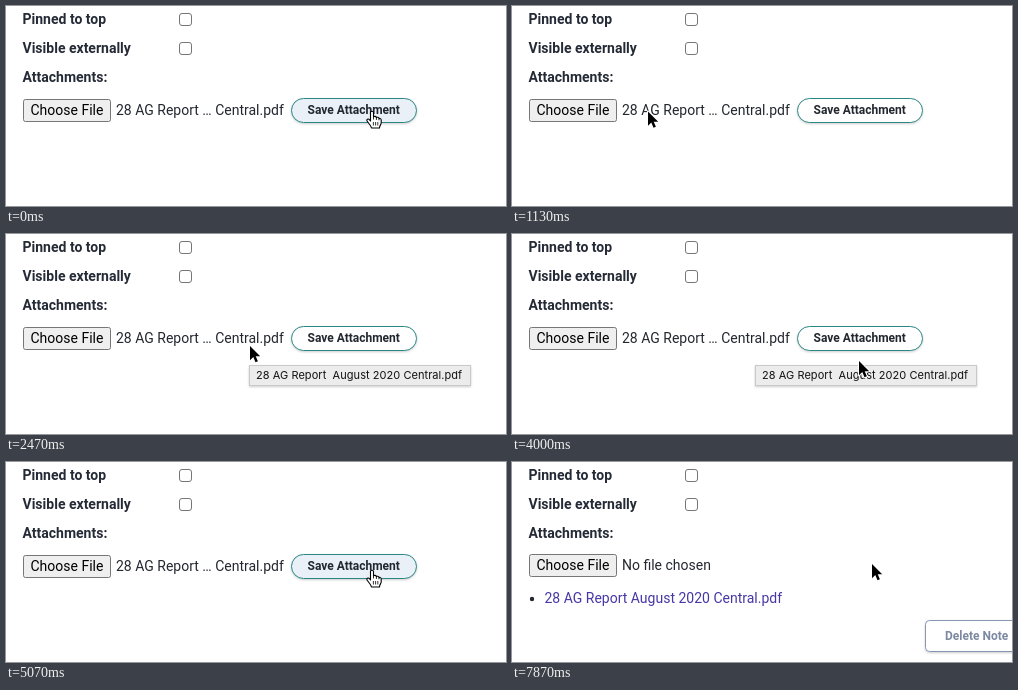
An HTML page for the animation above (8000 ms loop, 500 by 200 pixels).

```html
<!DOCTYPE html>
<html lang="en">
<head>
<meta charset="utf-8">
<title>Saving an attachment</title>
<style>
  html, body { margin: 0; width: 100%; height: 100%; overflow: hidden; background: #fff; }
  svg { display: block; width: 500px; height: 200px; }
  text { font: 14px Roboto, sans-serif; fill: #23272f; white-space: pre; }
  .label { font-weight: 700; fill: #252b36; }
  .action { font-size: 12px; font-weight: 700; }
  .tip { font: 11px Inter, sans-serif; fill: #111; letter-spacing: .05px; }
  .check { fill: #fff; stroke: #767676; }
</style>
</head>
<body>
<svg viewBox="0 0 500 200">
  <defs>
    <filter id="soft" x="-10%" y="-30%" width="120%" height="180%">
      <feDropShadow dx="0" dy="1" stdDeviation="1" flood-opacity=".2"/>
    </filter>
  </defs>
  <rect width="500" height="200" fill="#fff"/>

  <text class="label" x="16.5" y="18">Pinned to top</text>
  <text class="label" x="16.5" y="47">Visible externally</text>
  <text class="label" x="16.5" y="76">Attachments:</text>
  <rect class="check" x="173.5" y="7.5" width="12" height="12" rx="2.5"/>
  <rect class="check" x="173.5" y="36.5" width="12" height="12" rx="2.5"/>

  <g id="picker">
    <rect id="choose" x="17.5" y="93.5" width="87" height="22" rx="2"/>
    <text x="24.5" y="109" style="fill:#000">Choose File</text>
    <text id="fileName" x="110" y="109"></text>
  </g>

  <g id="save">
    <rect id="pill" x="285.5" y="92.5" width="125" height="24" rx="12" filter="url(#soft)"/>
    <rect id="focus" x="286" y="93" width="124" height="23" rx="4" fill="none" stroke="#5b9fe0" stroke-width="2"/>
    <text class="action" x="301.5" y="108">Save Attachment</text>
  </g>

  <g id="saved">
    <circle cx="20" cy="137" r="2.2" fill="#23272f"/>
    <text x="32.5" y="141" style="fill:#4637a5">28 AG Report August 2020 Central.pdf</text>
    <rect x="413.5" y="158.5" width="110" height="31" rx="4" fill="#fff" stroke="#8797b1" filter="url(#soft)"/>
    <text class="action" x="433" y="178" style="fill:#7c89a1">Delete Note</text>
  </g>

  <g id="tooltip">
    <rect x="243.5" y="131.5" width="221" height="20" fill="#ececec" stroke="#c9c9c9" filter="url(#soft)"/>
    <text class="tip" x="250" y="145">28 AG Report  August 2020 Central.pdf</text>
  </g>

  <g id="cursor" stroke-linejoin="round">
    <path id="arrow" d="M0 0V14.2L3.3 11.1 5.5 16.3 7.9 15.3 5.7 10.2H10.2Z"
      fill="#000" stroke="#fff" stroke-width="2" paint-order="stroke"/>
    <g id="hand" stroke="#000" stroke-width="1.1">
      <path d="M-1.5 1.6C-1.5-.3 1.5-.3 1.5 1.6V6C2 5 4.3 5.2 4.4 6.7 5 5.8 7 6.2 7 7.7 8 7 9.2 7.7 9.2 9V12C9 14 7.5 14.5 7.5 17H-.5C-.8 14.8-3 13-4.8 10.3-6 8.6-3.8 7.2-2.6 8.7L-1.5 10Z" fill="#fff"/>
      <path d="M1.5 6V8.5M4.4 6.7V9M7 7.7V9.3M1.4 11V14.5M3.6 11V14.5M5.8 11V14.5" fill="none" stroke-width=".8"/>
    </g>
  </g>
</svg>
<script>
const LOOP = 8000, TICKS_PER_MS = 15 / 1000;
const el = id => document.getElementById(id);
const show = (id, on) => el(id).setAttribute('display', on ? 'inline' : 'none');
const paint = (id, attrs) => {
  for (const [name, value] of Object.entries(attrs)) el(id).setAttribute(name, value);
};
const clamp = v => Math.min(1, Math.max(0, v));

const linear = u => u;
const out = u => 1 - (1 - u) ** 2;
const smooth = u => u * u * (3 - 2 * u);
const swing = u => (1 - Math.cos(.75 * Math.PI * u)) / (1 - Math.cos(.75 * Math.PI));

// Pointer stops: tick, x, y and the easing used to arrive there.
const stops = [
  [0, 366, 105], [9, 62.5, 104.5, swing], [12, 12, 109, out], [13, 12, 109, linear],
  [17, 136, 105.5, linear], [25, 244, 112, out], [58, 244, 112, linear],
  [62, 450, 142, smooth], [63, 450, 142, linear], [68, 374, 123, smooth],
  [71, 367, 112, out], [73, 367, 112, linear], [76, 366, 108, out],
  [86, 366, 108, linear], [87, 360, 103, linear], [117, 360, 103, linear],
  [118, 360, 102, linear], [120, 360, 102, linear]
];

function pointerAt(tick) {
  const i = Math.max(1, stops.findIndex(stop => stop[0] >= tick));
  const [t0, x0, y0] = stops[i - 1], [t1, x1, y1, ease] = stops[i];
  const u = ease(clamp((tick - t0) / (t1 - t0)));
  return [x0 + (x1 - x0) * u, y0 + (y1 - y0) * u];
}

function render(ms) {
  const tick = Math.floor((ms % LOOP + 4) * TICKS_PER_MS) % 120;
  const [x, y] = pointerAt(tick);
  const within = (left, top, right, bottom) => x >= left && x <= right && y >= top && y <= bottom;
  const saved = tick >= 117, focused = tick >= 96;
  const overSave = within(285, 92, 411, 117);
  const overChoose = within(17, 93, 105, 116);

  paint('choose', { fill: overChoose ? '#dfdfdf' : '#efefef', stroke: overChoose ? '#505050' : '#767676' });
  paint('picker', { transform: `translate(0 ${saved ? -1 : 0})` });
  el('fileName').textContent = saved ? 'No file chosen' : '28 AG Report … Central.pdf';

  show('save', !saved);
  show('saved', saved);
  show('focus', focused);
  paint('pill', { fill: overSave ? '#e9f0f7' : '#fff', stroke: focused ? '#4a8fc4' : '#2b8784' });

  const fade = clamp((71 - tick) / 7);
  show('tooltip', tick >= 37 && fade > 0);
  paint('tooltip', { opacity: fade });

  const pointing = overSave && tick < 118;
  show('hand', pointing);
  show('arrow', !pointing);
  paint('cursor', { transform: `translate(${x.toFixed(1)} ${y.toFixed(1)})` });
}

const start = performance.now();
function loop() {
  render(performance.now() - start);
  requestAnimationFrame(loop);
}
loop();
</script>
</body>
</html>
```
